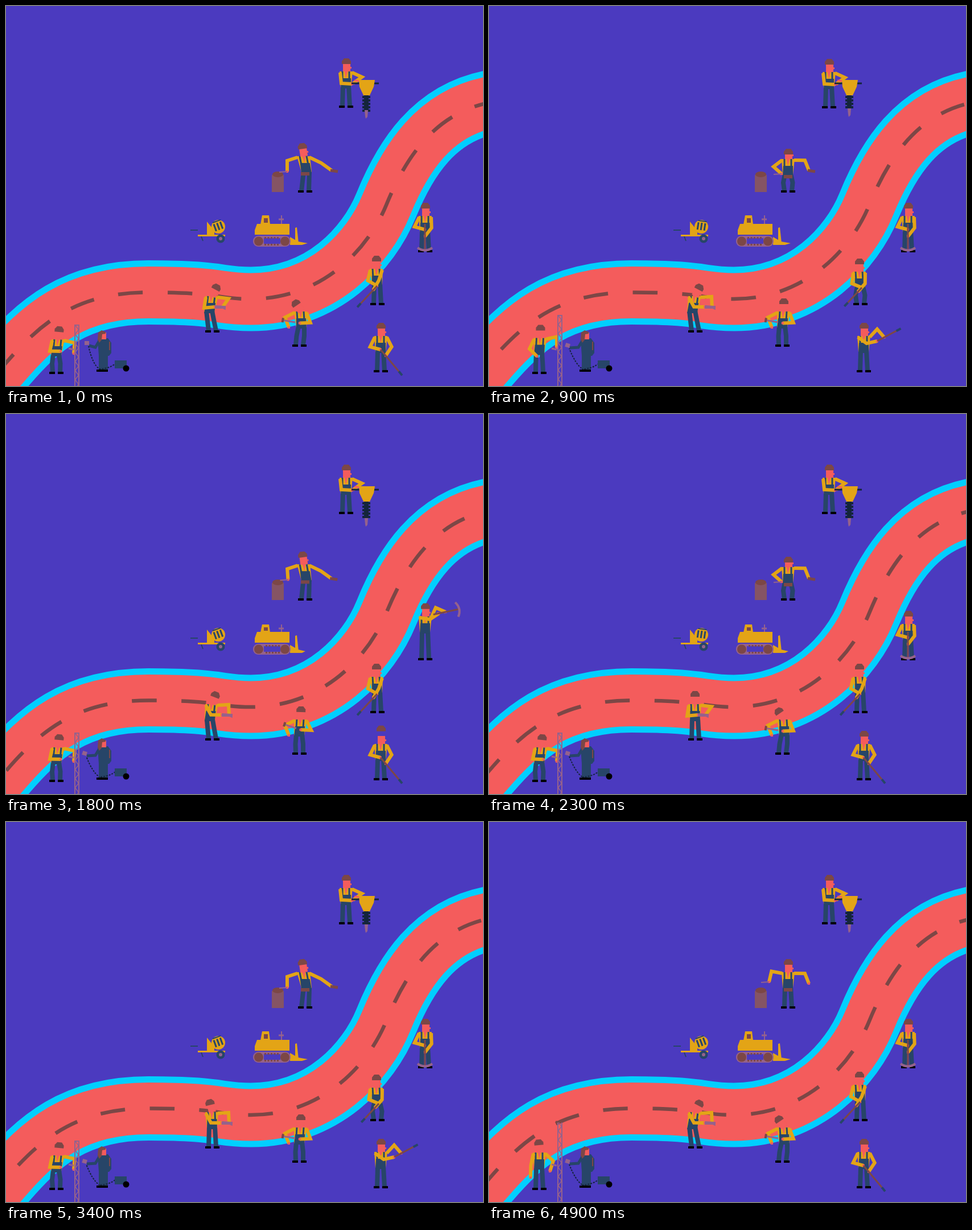
Recreate the animation shown at these times as an HTML page with a canvas. Size 838 by 668 pixels, loop 5 s.

```html
<!DOCTYPE html>
<html lang="en">
<head>
<meta charset="utf-8">
<title>Road works</title>
<style>
  html, body { margin: 0; width: 100%; height: 100%; overflow: hidden; background: #4b3abf; }
  canvas { display: block; }
</style>
</head>
<body>
<canvas id="stage" width="838" height="668"></canvas>
<script>
const ctx = document.getElementById('stage').getContext('2d');
const LOOP = 5000, TICK = 100, HALF = LOOP / 2, THIRD = LOOP / 3, SIXTH = LOOP / 6;
const BLUE = '#4b3abf', RED = '#f45c5c', CYAN = '#00cfff', BROWN = '#7c4746', YELLOW = '#e3a416',
  NAVY = '#274568', DARK = '#14253c', MAUVE = '#95628c', BARREL = '#855464', BLACK = '#000';

function trace(pts) {
  ctx.beginPath();
  for (let i = 0; i < pts.length; i += 2) ctx.lineTo(pts[i], pts[i + 1]);
}
function poly(color, ...pts) {
  trace(pts);
  ctx.fillStyle = color;
  ctx.fill();
}
function line(color, width, ...pts) {
  trace(pts);
  ctx.strokeStyle = color;
  ctx.lineWidth = width;
  ctx.stroke();
}
function rect(color, x1, y1, x2, y2) {
  ctx.fillStyle = color;
  ctx.fillRect(x1, y1, x2 - x1, y2 - y1);
}
function disc(color, x, y, rx, ry = rx) {
  ctx.beginPath();
  ctx.ellipse(x, y, rx, ry, 0, 0, 7);
  ctx.fillStyle = color;
  ctx.fill();
}
function curve(color, width, x1, y1, cx, cy, x2, y2) {
  ctx.beginPath();
  ctx.moveTo(x1, y1);
  ctx.quadraticCurveTo(cx, cy, x2, y2);
  ctx.strokeStyle = color;
  ctx.lineWidth = width;
  ctx.stroke();
}
function local(x, y, angle, paint) {
  ctx.save();
  ctx.translate(x, y);
  ctx.rotate(angle);
  paint();
  ctx.restore();
}

const smooth = k => k * k * (3 - 2 * k);
const ramp = (v, from, to) => smooth(Math.min(1, Math.max(0, (v - from) / (to - from))));

// Blends [time, pose] keys over a repeating period
function tween(t, period, ...keys) {
  const p = t % period;
  const i = keys.findLastIndex(([time]) => time <= p);
  const [t0, a] = keys[i], [t1, b] = keys[i + 1] || [period, keys[0][1]];
  const k = ramp(p, t0, t1), out = {};
  for (const f in a) out[f] = a[f] + (b[f] - a[f]) * k;
  return out;
}

const road = new Path2D(`M-60 698L-4 632C57 560.7 120 503.5 250 503.5S370 515 430 515
  C557 515 637 426 668 350C702 267 752 189.5 850 169.5L910 157`);
const PERIOD = 86.8, DASH_START = 329.5;

function drawRoad(t) {
  for (const [color, width] of [[CYAN, 113], [RED, 91]]) {
    ctx.strokeStyle = color;
    ctx.lineWidth = width;
    ctx.stroke(road);
  }
  ctx.setLineDash([PERIOD / 2]);
  ctx.lineDashOffset = 2 * PERIOD * t / LOOP - DASH_START;
  ctx.strokeStyle = BROWN;
  ctx.lineWidth = 6.5;
  ctx.stroke(road);
  ctx.setLineDash([]);
}

const BONE = 19;
function arm(side, sx, sy, hx, hy) {
  const dx = hx - sx, dy = hy - sy, d = Math.hypot(dx, dy) || 1;
  const out = side * Math.sqrt(Math.max(4, BONE * BONE - d * d / 4)) / d;
  line(YELLOW, 6, sx, sy, (sx + hx) / 2 + dy * out, (sy + hy) / 2 - dx * out, hx, hy);
  rect(RED, hx - 2, hy - 2, hx + 2, hy + 2);
}

// Offsets of neck (lean), hip, height (dip), head tilt (nod, radians) and cap
const STAND = { lean: 0, hip: 0, dip: 0, nod: 0, cap: 0 };

// Feet at the origin; hands are [x, y] from there
function man(x, y, pose, left, right) {
  const { lean, hip, dip, nod, cap } = { ...STAND, ...pose };
  const hy = dip - 36, ny = dip - 65, mx = lean + (hip - lean) * .45, my = ny + 13;
  local(x, y, 0, () => {
    for (const s of [-1, 1]) {
      const foot = s * 6.5 + .5, top = hip + s * 5;
      line(NAVY, 8, top, hy - 2, (foot + top) / 2 + s * Math.max(0, dip) * .5, hy / 2 - 2, foot, -3);
      rect(BLACK, foot - 5 + s, -4, foot + 5 + s, 0);
    }
    poly(YELLOW, lean - 11, ny + 1, lean + 12, ny + 1, hip + 9, hy, hip - 9, hy);
    poly(NAVY, mx - 8, my, mx + 9, my, hip + 9, hy + 2, hip - 9, hy + 2);
    poly(RED, lean - 3, ny - 2, lean + 4, ny - 2, mx, my);
    for (const s of [-6, 6]) line(NAVY, 3, lean + s, ny + 1, mx + s, my + 2);
    arm(-1, lean - 10, ny + 3, ...left);
    arm(1, lean + 11, ny + 3, ...right);
    local(lean + 1, ny, nod, () => {
      rect(RED, -6, -13, 7, 1);
      rect(RED, 7, -7, 9, -4);
      poly(BROWN, -8, cap - 12, -8, cap - 17, -4, cap - 22, 4, cap - 22, 8, cap - 17, 8, cap - 12);
    });
  });
}

// Tool held at (x, y) and turned by `a` degrees; hands sit on its shaft
const HOLD = { ...STAND, x: 0, y: -40, a: 90, len: 36 };
const hold = (changes, base = HOLD) => ({ ...base, ...changes });

function toolMan(x, y, pose, tool, gap, rest) {
  const a = pose.a * Math.PI / 180;
  const grip = [pose.x, pose.y];
  const second = [pose.x + gap * Math.cos(a), pose.y + gap * Math.sin(a)];
  man(x, y, pose, rest || grip, second);
  local(x + pose.x, y + pose.y, a, () => tool(pose.len));
}

function pick(len) {
  line(BROWN, 3, -10, 0, len, 0);
  curve(MAUVE, 4, len - 4, -13, len + 5, 0, len - 4, 13);
}
function shovel(len) {
  line(BROWN, 3, 0, 0, len, 0);
  line(NAVY, 4, len, 0, len + 9, 0);
}
function saw() {
  poly(MAUVE, 0, -3, 19, -3, 19, 4, 14, 2, 0, 3);
}
function hammer(len) {
  line(MAUVE, 3, -6, 0, len, 0);
  line(BROWN, 4, len, -4, len, 4);
}

const digging = (() => {
  const rest = hold({});
  const side = hold({ lean: -2, x: 2, y: -31, a: 40 });
  const out = hold({ lean: 4, hip: -4, dip: -4, x: 21, y: -47, a: -3 });
  const high = hold({ dip: -14, x: 26, y: -85, a: -18 });
  return t => tween(t, 1250, [0, rest], [50, side], [450, out], [500, high], [850, rest]);
})();

const clearing = (() => {
  const rest = hold({ lean: -2, y: -34, a: 133, len: 42 });
  const crouch = hold({ lean: -4, hip: 4, dip: 9, nod: -.7, x: 20, a: 127, len: 30 }, rest);
  const rise = hold({ dip: 5, x: 3, y: -31, len: 36 }, rest);
  const fling = hold({ lean: -15, hip: -8, dip: -15, x: -42, y: -72, a: 180, len: 76 }, rest);
  return t => tween(t, HALF, [0, rest], [500, crouch], [900, rise], [1300, fling], [1700, rest]);
})();

const shoveling = (() => {
  const rest = hold({ a: 50, len: 50 });
  const crouch = hold({ hip: -6, dip: 7, nod: .9, x: -24, y: -32, a: 40, len: 28 }, rest);
  const fling = hold({ x: 24, y: -55, a: -28, len: 38 }, rest);
  const tip = hold({ cap: -10 }, rest);
  return t => tween(t, HALF, [0, rest], [500, crouch], [900, fling], [1300, tip], [1700, tip], [2300, rest]);
})();

const sawing = (() => {
  const mid = hold({ lean: -1, x: 5, y: -45, a: 4 });
  const tilt = hold({ hip: -5, nod: .5 }, mid);
  const far = hold({ nod: -.25, x: 17 }, mid);
  const pull = hold({ x: 17 }, tilt);
  return t => tween(t, 1000, [0, tilt], [200, tilt], [300, mid], [400, far], [500, far], [900, pull]);
})();

const hammering = (() => {
  const hit = hold({ lean: 2, hip: 4, dip: 2, nod: -.6, x: -13, y: -44, a: 190, len: 16 });
  const look = hold({ hip: 0, nod: 0 }, hit);
  const high = hold({ lean: 1, nod: .25, x: 14, y: -99, a: 298, len: 12 }, look);
  return t => tween(t, SIXTH, [0, hit], [35, hit], [65, look], [460, high], [505, high], [630, hit]);
})();

function driller(t) {
  const d = [0, -3, 1, -3, 1][t / TICK % 5], y = Math.min(0, d);
  man(597, 179 + d, {}, [11, -42], [13, -43]);
  line(RED, 3, 612, 131 + y, 622, 132 + y);
  line(DARK, 3, 607, 136 + y, 655, 136 + y);
  poly(YELLOW, 620, 130 + y, 648, 130 + y, 646, 142 + y, 639, 157 + y, 628, 157 + y, 621, 142 + y);
  const shaft = d > 0 ? 180 : 183;
  rect(DARK, 629, 157 + y, 637, shaft);
  for (let r = 158 + y; r < shaft; r += 6) rect(DARK, 626, r, 640, r + 4);
  poly(MAUVE, 630, shaft, 636, shaft, 635, shaft + 12, 632, shaft + 15, 631, shaft + 11);
}

const plastering = (() => {
  const reach = { ...STAND, lean: -3, hip: 3, nod: -.15, lx: -31, ly: -37, rx: 47, ry: -39 };
  const crouch = { ...STAND, dip: 5, cap: 5, lx: -11, ly: -33, rx: 37, ry: -39 };
  const open = { ...STAND, lx: -33, ly: -47, rx: 37, ry: -44 };
  return t => tween(t, THIRD, [0, reach], [70, reach], [450, crouch], [900, crouch], [1300, open], [1570, open]);
})();

function plasterer(t) {
  rect(BARREL, 467, 297, 488, 327);
  disc(BROWN, 477.5, 296, 9.5, 5);
  const p = plastering(t);
  man(525, 328, p, [p.lx, p.ly], [p.rx, p.ry]);
  local(525, 328, 0, () => {
    rect(BROWN, -7, p.dip - 36, 8, p.dip - 30);
    line(MAUVE, 2, p.lx - 14, p.ly + 1, p.lx, p.ly);
    if (t % THIRD < 1100) line(BROWN, 5, p.rx - 2, p.ry, p.rx + 11, p.ry + 2);
  });
}

function mastMan(t) {
  const phase = t % THIRD, rise = ramp(phase, 600, 1200), drop = ramp(phase, 1350, 1560);
  const low = 1 - rise;
  man(88, 647, { lean: 3 * low, dip: 5 * low - 2, nod: .2 * low - .1 },
    [8 - 23 * rise, -40 + 18 * rise], [31 - 12 * drop, -36 - 21 * rise + 24 * drop]);
  line(MAUVE, 3, 110, 602, 119, 604);

  const top = Math.round(561 - 34 * rise);
  line(MAUVE, 2, 121, 668, 121, top, 128, top, 128, 668);
  for (let y = top, s = 1; y < 668; y += 8, s = -s) line(MAUVE, 1.5, 124.5 - 3 * s, y, 124.5 + 3 * s, y + 8);
  if (drop > .5) line(BROWN, 3, 117, top, 130, top);
}

function welder(t) {
  const up = ramp(t % HALF, 0, 400), gx = 142 - 4 * up, gy = 593 + 4 * up;
  for (const x of [167, 175]) {
    line(NAVY, 8, x, 610, x, 639);
    rect(BLACK, x - 8, 639, x + 4, 643);
  }
  poly(NAVY, 161, 586, 179, 584, 185, 592, 185, 610, 181, 615, 163, 615);
  line(NAVY, 5, 163, 590, 157, 600, gx + 4, gy + 4);
  line(BROWN, 2, 182, 590, 182, 605);
  rect(RED, 167, 574, 176, 586);
  poly(BROWN, 162, 574, 168, 570, 175, 573, 175, 576, 169, 577, 168, 587, 164, 592, 161, 586);
  local(gx, gy, .3 * up, () => rect(MAUVE, -4, -4, 4, 3));
  ctx.setLineDash([3, 2]);
  curve(DARK, 2, gx + 3, gy + 5, 152, 630, 164, 638);
  curve(DARK, 2, 164, 638, 180, 638, 192, 629);
  ctx.setLineDash([]);
  rect(NAVY, 191, 623, 212, 637);
  disc(BLACK, 211, 637, 5.5);
}

function mixer(t) {
  line(NAVY, 2, 324, 394, 337, 394);
  line(NAVY, 2, 343, 405, 346, 413);
  rect(YELLOW, 337, 402, 385, 405);
  poly(YELLOW, 353, 379, 366, 395, 366, 403, 353, 403);
  disc(YELLOW, 373, 388, 12);
  const tilt = .5 * ramp(t % THIRD, 200, 500) * (1 - ramp(t % THIRD, 1000, 1300));
  local(373, 388, tilt - .35, () => {
    for (const x of [-6, 0, 6]) line(NAVY, 3, x, -7, x, 6);
    line(NAVY, 2, -7, -10, 8, -10);
  });
  disc(NAVY, 377, 409, 7.5);
  disc(MAUVE, 377, 409, 3);
}

function bulldozer(t) {
  const back = ramp(Math.cos(2 * Math.PI * t / 500), .1, -.1), d = 2 * back, x = -4 * back;
  poly(YELLOW, 447, 384, 450, 368 + d, 462, 368 + d, 464, 384);
  rect(BROWN, 453, 373 + d, 460, 381);
  line(MAUVE, 2, 484, 368 + d, 484, 383);
  line(MAUVE, 3, 479, 375 + d, 488, 375 + d);
  poly(YELLOW, 441, 383, 498, 383, 498, 402, 437, 402, 437, 394);
  poly(YELLOW, 499, 406, 513, 414, 530 + x, 417, 520, 420, 499, 420);
  poly(YELLOW, 508, 390, 511, 389, 514, 417, 508, 417);
  ctx.beginPath();
  ctx.roundRect(434, 404, 66, 19, 9);
  ctx.fillStyle = MAUVE;
  ctx.fill();
  rect(BLUE, 453, 408, 482, 418);
  for (let tx = 454 + d; tx < 480; tx += 5.5) {
    rect(BROWN, tx, 406, tx + 3, 409);
    rect(BROWN, tx, 418, tx + 3, 421);
  }
  for (const wx of [444, 490]) disc(BROWN, wx, 413.5, 8);
}

function draw(t) {
  rect(BLUE, 0, 0, 838, 668);
  drawRoad(t);
  for (const part of [driller, plasterer, mixer, bulldozer, mastMan, welder]) part(t);
  toolMan(736, 433, digging(t), pick, 12);
  toolMan(652, 526, clearing(t), shovel, 10);
  toolMan(362, 574, sawing(t), saw, 13);
  toolMan(515, 599, hammering(t), hammer, -14, [-18, -34]);
  toolMan(658, 644, shoveling(t), shovel, 14);
}

const start = performance.now();
function loop() {
  const now = (performance.now() - start) % LOOP;
  draw(Math.floor(now / TICK) * TICK);
  requestAnimationFrame(loop);
}
loop();
</script>
</body>
</html>
```
